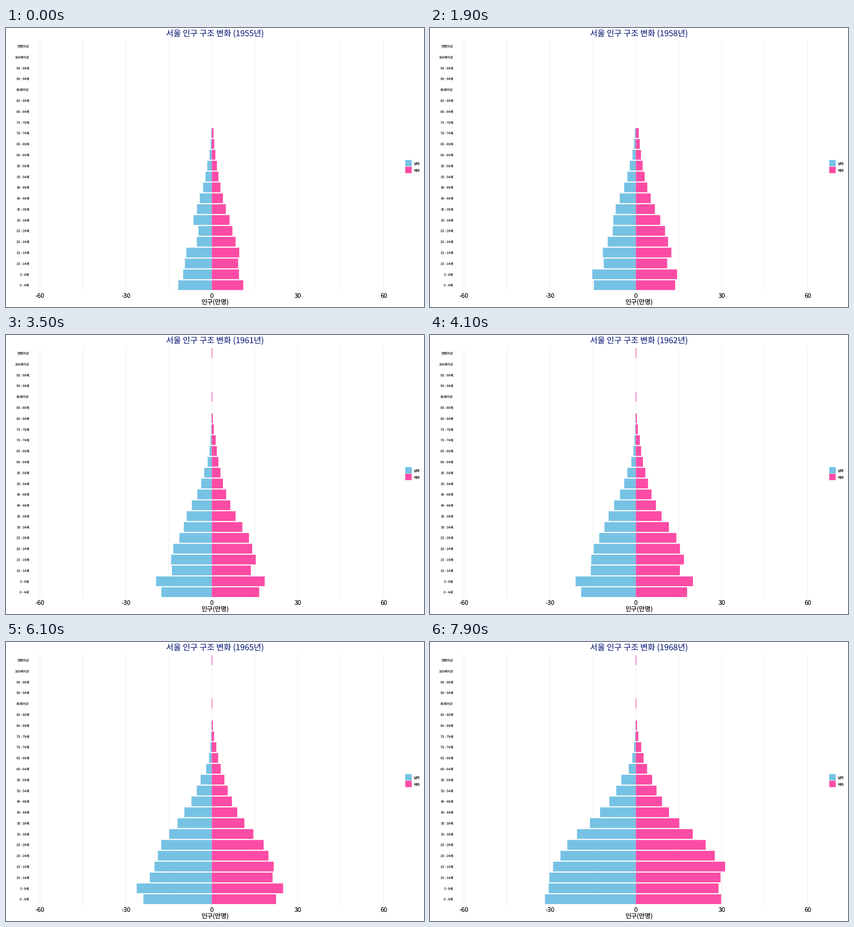
A matplotlib script for the animation above (8000 ms loop, 917 by 611 pixels).

```python
import numpy as np
import matplotlib.pyplot as plt
from matplotlib.animation import FuncAnimation
from matplotlib.patches import Rectangle

W, H, DPI = 917, 611, 100
FRAMES, INTERVAL = 80, 100
BLUE, PINK, NAVY = "#76c2e5", "#fd4ca5", "#1c2a80"

X0, UNIT = 451.45, 6.283         # zero line, pixels per 10,000 people
Y0, STEP, BAR = 563.2, 23.79, 21.4
YEARS_PER_FRAME = 0.1745

KEYS = [0, 29, 63, 79]           # frames of the known profiles
OLD = 15                         # groups from 75 up enter at the second key
GROUPS = np.arange(19)           # 0-4 ... 80-84, 85 and over, unknown
ROWS = [*range(17), 18, 22]

# Thousands of women at a few age groups, one profile per key
AGES = [0, 1, 2, 3, 5, 6, 8, 11, 14, 17]
WOMEN_AT = [
    [110, 95, 92, 96, 72, 62, 39, 18, 6, 2],
    [152, 170, 119, 139, 118, 98, 59, 27, 13, 2],
    [229, 254, 218, 221, 185, 148, 91, 45, 16, 2],
    [298, 289, 296, 312, 244, 199, 116, 57, 19, 2],
]
WOMEN_PER_MAN = [.94, .95, .98, 1.08, 1.02, .97, .93, 1.13, 3.2, 4]
MEN_AWAY = [.34, .15, 0, 0]      # share of men missing in the drafted cohort

LABELS = [f"{a} - {a + 4}세" for a in range(0, 90, 5)]
LABELS += ["85세이상", "90 - 94세", "95 - 99세", "100세이상", "연령미상"]

plt.rcParams["font.family"] = ["Noto Sans CJK JP", "DejaVu Sans"]
plt.rcParams["text.hinting"] = "none"


def by_age(values):
    """Geometric interpolation over the age groups."""
    return np.exp(np.interp(GROUPS, AGES, np.log(values)))


def men_from(women, k):
    drafted = abs(GROUPS - 4.5 - k) < 1
    return women / by_age(WOMEN_PER_MAN) * (1 - MEN_AWAY[k] * drafted)


women_keys = [by_age(p) for p in WOMEN_AT]
men_keys = [men_from(p, k) for k, p in enumerate(women_keys)]

fig = plt.figure(figsize=(W / DPI, H / DPI), dpi=DPI, facecolor="white")
ax = fig.add_axes([0, 0, 1, 1])
ax.set(xlim=(0, W), ylim=(H, 0))
ax.axis("off")


def text(x, y, s, px, color="black", ha="center"):
    return ax.text(x, y, s, fontsize=px * 72 / DPI, color=color, ha=ha, va="baseline")


def box(x, y, w, h, color):
    return ax.add_patch(Rectangle((x, y), w, h, fc=color, lw=0, snap=False, zorder=3))


for v in range(-60, 61, 15):
    x = X0 + v * UNIT
    ax.plot([x, x], [25.4, 577.3], color="#ebebeb", lw=72 / DPI, zorder=1,
            solid_capstyle="butt", snap=False)
    if v % 30 == 0:
        text(x, 591, str(v).replace("\u2212", "-"), 13.6)

for i, s in enumerate(LABELS):
    text(50.5, Y0 - i * STEP + 2.7, s, 7.1, "#333333", "right")

text(458, 605, "인구(만명)", 13.9)
for y, color, s in [(289.2, BLUE, "남자"), (303.9, PINK, "여자")]:
    box(875.8, y, 14.2, 14, color)
    text(894.3, y + 10.2, s, 7.2, ha="left")

title = text(458, 18.8, "", 17.8, NAVY)
tops = [Y0 - r * STEP - BAR / 2 for r in ROWS]
men_bars = [box(X0, y, 0, BAR, BLUE) for y in tops]
women_bars = [box(X0, y, 0, BAR, PINK) for y in tops]


def widths(profiles, frame):
    w = np.array([np.interp(frame, KEYS, p) for p in zip(*profiles)])
    if frame < KEYS[1]:
        w[OLD:] = 0
    return w * UNIT / 10


def update(frame):
    title.set_text(f"서울 인구 구조 변화 ({1955 + int(frame * YEARS_PER_FRAME)}년)")
    for bar, w in zip(men_bars, widths(men_keys, frame)):
        bar.set_x(X0 - w)
        bar.set_width(w)
    for bar, w in zip(women_bars, widths(women_keys, frame)):
        bar.set_width(w)
    return [title, *men_bars, *women_bars]


anim = FuncAnimation(fig, update, frames=FRAMES, interval=INTERVAL,
                     init_func=lambda: update(0), repeat=True, repeat_delay=0)
plt.show()
```
